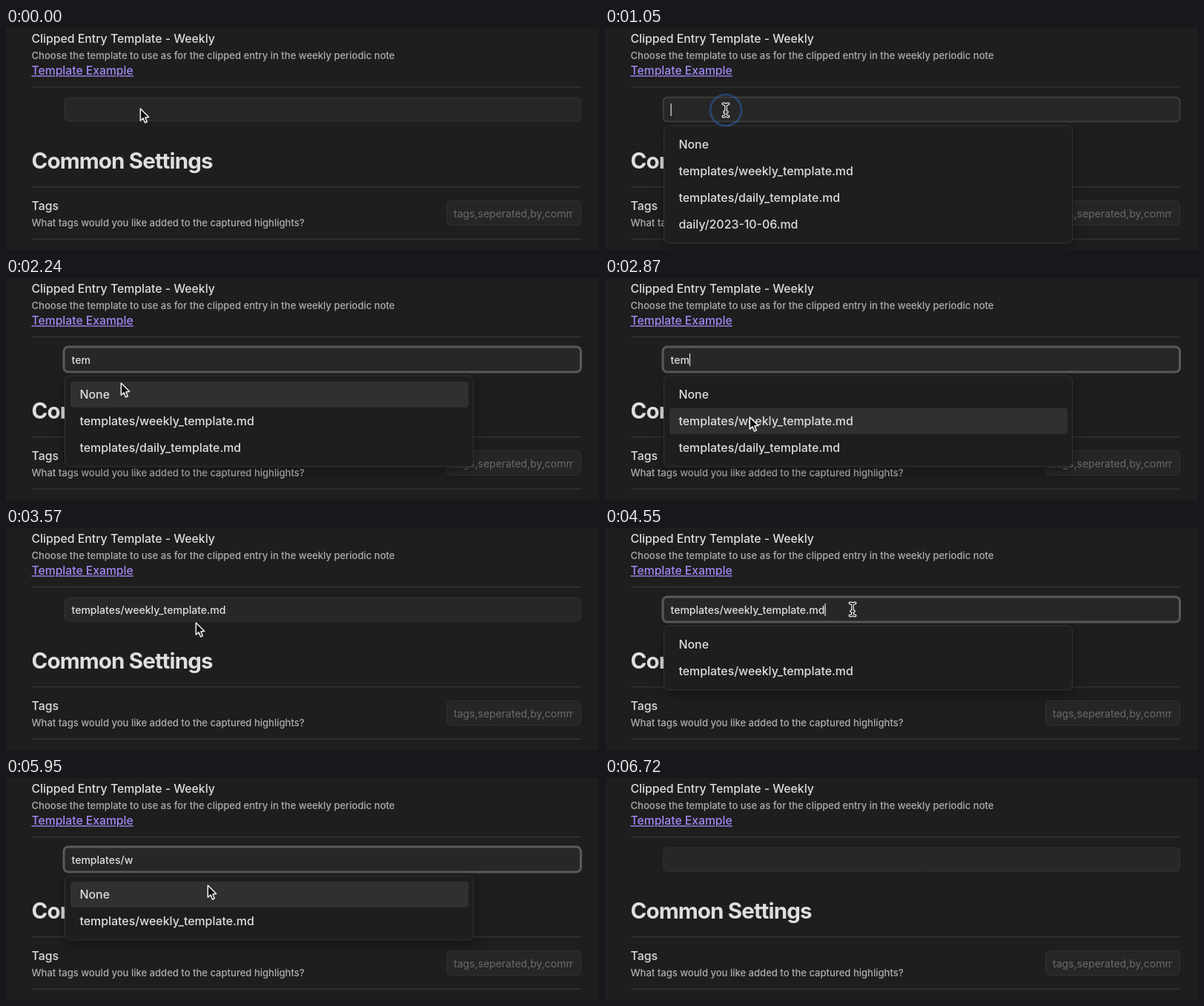
An HTML page with a canvas that plays this animation: 800 px wide and 300 px high, repeating every 6790 ms.

```html
<!DOCTYPE html>
<html lang="en">
<head>
<meta charset="utf-8">
<title>Template settings</title>
<style>
  html, body { margin: 0; width: 100%; height: 100%; overflow: hidden; background: #1e1e1e; }
  canvas { display: block; width: 800px; height: 300px; }
</style>
</head>
<body>
<canvas id="stage"></canvas>
<script>
const canvas = document.getElementById('stage');
const ctx = canvas.getContext('2d');
const ratio = window.devicePixelRatio || 1;
canvas.width = 800 * ratio;
canvas.height = 300 * ratio;

const LOOP = 6790;
const BG = '#1e1e1e';
const INK = '#dedede';
const MUTED = '#aeaeae';
const LINK = '#a287f4';
const FACE = 'Inter, "Open Sans", sans-serif';
const WEEKLY = 'templates/weekly_template.md';
const ITEMS = ['None', WEEKLY, 'templates/daily_template.md', 'daily/2023-10-06.md'];

// Sessions: the field is focused by a click and closed by picking an item.
const SESSIONS = [
  { open: 950, close: 2930 },
  { open: 4240, close: 6270 }
];
const TYPED = [1480, 1590, 1690];
const ERASE = { start: 4700, step: 41, count: 17 };
const CURSOR_END = 6520;
const CLICK_MS = 320;
const FADE_MS = 280;

// time, x, y
const PATH = [
  [0, 182, 108], [700, 163, 111], [1960, 163, 111], [2240, 156, 141],
  [2800, 196, 187], [3120, 196, 187], [3570, 257, 127], [4050, 334, 110],
  [5650, 334, 110], [5950, 273, 144], [6200, 178, 155], [LOOP, 178, 155]
];

const clamp = v => Math.max(0, Math.min(1, v));
const mix = (a, b, k) => a + (b - a) * k;
const ease = k => k * k * (3 - 2 * k);
const gray = v => `rgb(${v},${v},${v})`;

function setFont(size, weight = 500) {
  ctx.font = `${weight} ${size}px ${FACE}`;
}

function text(str, x, y, size, color, weight) {
  setFont(size, weight);
  ctx.fillStyle = color;
  ctx.fillText(str, x, y);
}

function box(x, y, w, h, r, fill, line, width = 1) {
  ctx.beginPath();
  ctx.roundRect(x, y, w, h, r);
  if (fill) {
    ctx.fillStyle = fill;
    ctx.fill();
  }
  if (line) {
    ctx.shadowColor = 'transparent';
    ctx.strokeStyle = line;
    ctx.lineWidth = width;
    ctx.stroke();
  }
}

function pointer(t) {
  const i = Math.max(1, PATH.findIndex(p => p[0] > t));
  const [t0, x0, y0] = PATH[i - 1];
  const [t1, x1, y1] = PATH[i];
  const k = ease(clamp((t - t0) / (t1 - t0)));
  return { x: mix(x0, x1, k), y: mix(y0, y1, k) };
}

function fieldState(t) {
  const session = SESSIONS.find(s => t >= s.open && t < s.close);
  let value = '', edited = session ? session.open : 0, count = 4;
  if (t < SESSIONS[0].close) {
    const n = TYPED.filter(k => t >= k).length;
    value = 'tem'.slice(0, n);
    if (n) {
      edited = TYPED[n - 1];
      count = 3;
    }
  } else if (t < SESSIONS[1].close) {
    const n = Math.max(0, Math.min(ERASE.count, Math.floor((t - ERASE.start) / ERASE.step) + 1));
    value = WEEKLY.slice(0, WEEKLY.length - n);
    if (n) edited = ERASE.start + (n - 1) * ERASE.step;
    count = 2;
  }
  let focus = 0;
  for (const s of SESSIONS) {
    if (t >= s.open) focus = clamp((t - s.open) / FADE_MS) - clamp((t - s.close) / FADE_MS);
  }
  return { value, count, focus, open: !!session, caret: session && (t - edited) % 1060 < 530 };
}

function drawLink(str, x, y, size) {
  setFont(size);
  ctx.fillStyle = LINK;
  ctx.fillRect(x, y + 1.4, ctx.measureText(str).width, 1.5);
  ctx.strokeStyle = BG;
  ctx.lineWidth = 2.6;
  ctx.strokeText(str, x, y);
  text(str, x, y, size, LINK);
}

function drawPage() {
  ctx.fillStyle = BG;
  ctx.fillRect(0, 0, 800, 300);
  text('Clipped Entry Template - Weekly', 34.5, 19.5, 15.8, INK);
  text('Choose the template to use as for the clipped entry in the weekly periodic note',
    34.5, 42, 13.05, MUTED);
  drawLink('Template Example', 34.5, 62.7, 15.7);

  ctx.letterSpacing = '-0.85px';
  text('Common Settings', 34.5, 190, 29.5, INK, 700);
  ctx.letterSpacing = '0px';

  text('Tags', 34.5, 245.5, 15.8, INK);
  text('What tags would you like added to the captured highlights?', 34.5, 268, 13.05, MUTED);

  ctx.fillStyle = '#343434';
  for (const y of [79, 214, 284.5]) ctx.fillRect(35, y, 741, 1.4);

  box(594.5, 233.5, 181, 33, 5, '#262626', '#313131');
  ctx.save();
  ctx.beginPath();
  ctx.rect(600, 234, 165, 32);
  ctx.clip();
  text('tags,seperated,by,comma', 604, 255.5, 14, '#6a6a6a', 400);
  ctx.restore();
}

function drawField(s) {
  const f = s.focus;
  box(79 - f, 94 - f, 696.5 + f, 32 + 2 * f, 5 + f, '#272727',
    gray(Math.round(mix(50, 90, f))), 1 + 2 * f);
  text(s.value, 88.5, 115.5, 14.05, INK);
  if (s.caret) {
    const x = 88.5 + ctx.measureText(s.value).width;
    ctx.fillStyle = '#e4e4e4';
    ctx.fillRect(x, 102, 1.2, 17);
  }
}

function drawMenu(count, p) {
  ctx.save();
  ctx.shadowColor = 'rgba(0,0,0,0.35)';
  ctx.shadowBlur = 15 * ratio;
  ctx.shadowOffsetY = 5 * ratio;
  box(79.5, 132, 551, 15 + 36 * count, 7, BG, '#343434');
  ctx.restore();
  for (let i = 0; i < count; i++) {
    const y = 140 + 36 * i;
    if (p.x > 87 && p.x < 624 && p.y >= y && p.y < y + 36) {
      box(87, y, 537, 35, 4, '#303030');
    }
    text(ITEMS[i], 99.5, y + 23.4, 15.9, INK);
  }
}

function drawRing(t, p) {
  for (const at of SESSIONS.flatMap(s => [s.open, s.close])) {
    const k = (t - at) / CLICK_MS;
    if (k < 0 || k >= 1) continue;
    ctx.beginPath();
    ctx.arc(p.x, p.y, 17.5 + 11 * k, 0, Math.PI * 2);
    ctx.strokeStyle = `rgba(48,98,180,${0.7 * (1 - k)})`;
    ctx.lineWidth = 3;
    ctx.stroke();
  }
}

function drawArrow(x, y) {
  ctx.save();
  ctx.translate(x - 0.7, y + 1);
  ctx.beginPath();
  ctx.moveTo(0, 0);
  ctx.lineTo(0, 16.2);
  ctx.lineTo(3.7, 12.9);
  ctx.lineTo(6.2, 19);
  ctx.lineTo(9, 17.8);
  ctx.lineTo(6.5, 11.9);
  ctx.lineTo(11.4, 11.5);
  ctx.closePath();
  ctx.fillStyle = '#0c0c0c';
  ctx.fill();
  ctx.strokeStyle = '#f2f2f2';
  ctx.lineWidth = 1.5;
  ctx.lineJoin = 'round';
  ctx.stroke();
  ctx.restore();
}

function drawBeam(x, y) {
  ctx.save();
  ctx.translate(x, y);
  ctx.beginPath();
  for (const d of [-1, 1]) {
    ctx.moveTo(-3.5, 8.5 * d);
    ctx.quadraticCurveTo(0, 8.5 * d, 0, 6 * d);
    ctx.quadraticCurveTo(0, 8.5 * d, 3.5, 8.5 * d);
  }
  ctx.moveTo(0, -6);
  ctx.lineTo(0, 6);
  ctx.moveTo(-2, 2.5);
  ctx.lineTo(2, 2.5);
  ctx.lineCap = 'round';
  ctx.strokeStyle = '#f2f2f2';
  ctx.lineWidth = 3.8;
  ctx.stroke();
  ctx.strokeStyle = '#101010';
  ctx.lineWidth = 1.3;
  ctx.stroke();
  ctx.restore();
}

function draw(t) {
  ctx.setTransform(ratio, 0, 0, ratio, 0, 0);
  const s = fieldState(t);
  const p = pointer(t);
  drawPage();
  drawField(s);
  if (s.open) drawMenu(s.count, p);
  if (t >= CURSOR_END) return;
  drawRing(t, p);
  const overField = p.x > 79 && p.x < 776 && p.y > 94 && p.y < 126;
  if (overField && t > 100) drawBeam(p.x, p.y);
  else drawArrow(p.x, p.y);
}

const begin = performance.now();
function tick() {
  draw((performance.now() - begin) % LOOP);
  requestAnimationFrame(tick);
}
draw(0);
requestAnimationFrame(tick);
</script>
</body>
</html>
```
